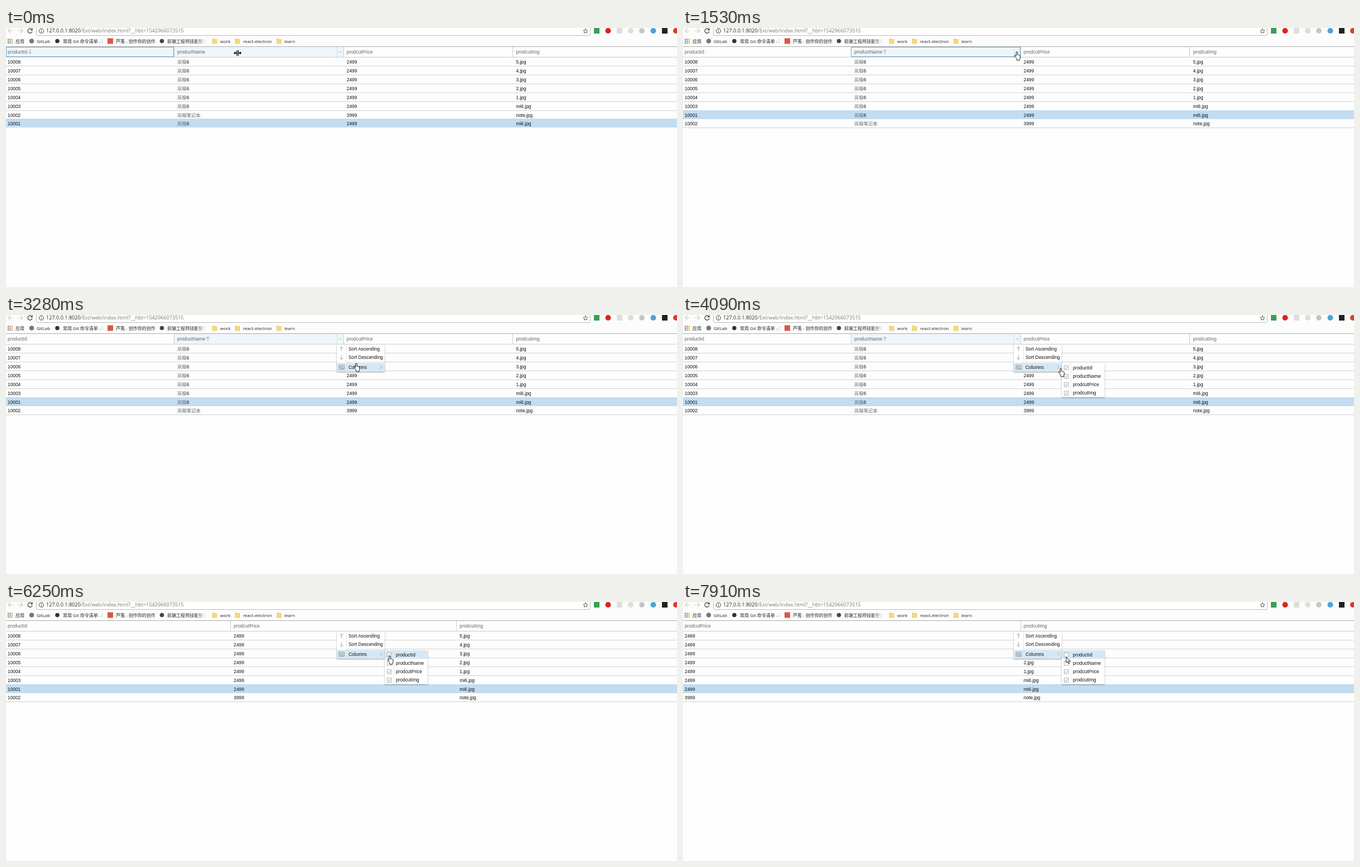
Recreate the animation shown at these times as an HTML page. Size 1203x466 px, loop 8000 ms.

```html
<!DOCTYPE html>
<html lang="zh">
<head>
<meta charset="utf-8">
<title>Grid columns</title>
<style>
html, body { margin: 0; width: 100%; height: 100%; overflow: hidden; background: #fdfdfd; }
svg { display: block; width: 1203px; height: 466px; }
text { font: 8.35px "Liberation Sans", "Noto Sans CJK SC", "Noto Sans CJK", sans-serif; fill: #111; white-space: pre; }
.bar text { font: 8px "Open Sans", "Noto Sans CJK SC", "Noto Sans CJK", sans-serif; fill: #222; }
.bar .url { font-size: 9.1px; }
.url .path { fill: #777; }
.head { fill: #666; }
.cjk { fill: #666; font-weight: 300; }
.icon { fill: none; stroke: #999; stroke-width: .9; }
.cursor { stroke: #000; stroke-width: .9; stroke-linejoin: round; fill: #fff; }
</style>
</head>
<body>
<svg viewBox="0 0 1203 466">
  <defs>
    <linearGradient id="fade"><stop stop-color="#fcfcfc" stop-opacity="0"/><stop offset="1" stop-color="#fcfcfc"/></linearGradient>
    <filter id="shadow" x="-10%" y="-10%" width="120%" height="130%"><feDropShadow dx="0" dy="1" stdDeviation="1.3" flood-color="#666" flood-opacity=".65"/></filter>
  </defs>
  <rect width="1203" height="466" fill="#fdfdfd"/>
  <g class="bar">
    <rect width="1203" height="33" fill="#fcfcfc"/>
    <path d="M54.5 0V11Q54.5 13.5 57 13.5H1045Q1047.5 13.5 1047.5 11V0" fill="#fff" stroke="#bbb"/>
    <g fill="none" stroke="#ccc" stroke-width="1.1">
      <path d="M13 5H4M8 1 4 5 8 9M21 5H30M26 1 30 5 26 9"/>
      <path d="M46.5 3A4 4 0 1 0 47 6.2M47.2.5V3.7H44" stroke="#444" stroke-width="1.3"/>
      <g stroke="#555"><circle cx="63.5" cy="5.2" r="4"/><path d="M63.5 4.6V7.8M63.5 2.5V3.6"/></g>
      <path d="M1039 1 1040.2 4 1043.2 4.2 1040.9 6.2 1041.6 9.2 1039 7.6 1036.4 9.2 1037.1 6.2 1034.8 4.2 1037.8 4Z" stroke="#555" stroke-width=".9"/>
    </g>
    <text class="url" x="72" y="8.4">127.0.0.1:8020<tspan class="path">/Ext/web/index.html?__hbt=1542966073515</tspan></text>
    <g id="marks"></g>
    <text x="17" y="26.8">应用</text>
    <text x="55" y="26.8">GitLab</text>
    <text x="102" y="26.8">常用 Git 命令清单 -</text>
    <path d="M172.5 20V28" stroke="#ccc"/>
    <text x="197" y="26.8">芦笺 - 创作你的创作</text>
    <text x="289" y="26.8">前端工程师技能整理</text>
    <rect x="340" y="16" width="18" height="14" fill="url(#fade)"/>
    <rect x="358" y="16" width="6" height="14" fill="#fcfcfc"/>
    <text x="384" y="26.8">work</text>
    <text x="425" y="26.8">react-electron</text>
    <text x="499" y="26.8">learn</text>
  </g>
  <g id="view"></g>
</svg>
<script>
const LOOP = 8000, HEAD_Y = 33, ROW_Y = 52.5, ROW_H = 15.9;
const FIELDS = ['productId', 'productName', 'prodcutPrice', 'prodcutImg'];
const PHONE = '岚榆6', LAPTOP = '岚榆笔记本';
const ROWS = ['5.jpg', '4.jpg', '3.jpg', '2.jpg', '1.jpg', 'mi6.jpg', 'note.jpg', 'mi6.jpg']
  .map((img, i) => i === 6 ? ['10002', LAPTOP, '3999', img] : [String(10008 - i), PHONE, '2499', img]);

const rect = (x, y, w, h, fill, more = '') => `<rect x="${x}" y="${y}" width="${w}" height="${h}" fill="${fill}" ${more}/>`;
const text = (x, y, s, cls = '') => `<text x="${x}" y="${y}" class="${cls}">${s}</text>`;
const icon = (x, y, d) => `<path class="icon" transform="translate(${x} ${y})" d="${d}"/>`;
const dot = (x, y, r, fill) => `<circle cx="${x}" cy="${y}" r="${r}" fill="${fill}"/>`;

const UP = 'M0 9V1M-3 4 0 1 3 4', DOWN = 'M0 0V8M-3 5 0 8 3 5';
const CURSORS = {
  hand: '<path d="M-1 11-4 7.5Q-4.6 6.2-3.5 6-2.6 6-1.2 7.5V1Q-1.2 0 0 0 1.2 0 1.2 1V5Q2.4 4.6 3 5.6 4.2 5.2 4.6 6.3 6 6 6 7.5V10.5Q5.9 12 5 13.3V15H0V13.3Z"/>',
  arrow: '<path d="M0 0V10.5L2.4 8.2 4 12 5.8 11.2 4.2 7.6H7.4Z"/>',
  resize: '<path d="M-1.2-5V5M1.2-5V5M-6 0H-1.2M1.2 0H6M-4-2-6 0-4 2M4-2 6 0 4 2" fill="none" stroke-width="1.3"/>'
};

// [time, cursor, x, y, changes that persist]
const STEPS = [
  [0, 'resize', 415.3, 45, { cols: [0, 1, 2, 3], sort: 0, focus: 0, hover: [1], item: -1, menu: 0, sub: 0, subItem: -1, off: [] }],
  [130, 'hand', 424, 42],
  [270, 'hand', 430, 42, { focus: 1 }],
  [410, 'hand', 432, 42, { sort: 1 }],
  [550, 'hand', 440, 42],
  [690, 'hand', 468, 43],
  [830, 'hand', 510, 43],
  [970, 'hand', 552, 43],
  [1110, 'hand', 581, 42],
  [1260, 'hand', 588, 39],
  [1395, 'hand', 595, 40],
  [1530, 'hand', 598.5, 43],
  [1810, 'hand', 598.5, 43, { menu: 1 }],
  [2090, 'hand', 600, 45],
  [2250, 'hand', 602, 47],
  [2410, 'resize', 604, 49],
  [2570, 'resize', 606, 52, { hover: [1, 2] }],
  [2730, 'resize', 607.5, 53.7],
  [2880, 'hand', 613, 62, { hover: [1], focus: -1, item: 0 }],
  [3040, 'hand', 621, 79, { item: 1 }],
  [3160, 'hand', 628, 87, { item: 2 }],
  [3290, 'hand', 635, 90],
  [3420, 'hand', 642, 92, { sub: 1 }],
  [3560, 'hand', 650, 93],
  [3690, 'hand', 658, 94],
  [3820, 'hand', 666, 95],
  [3960, 'hand', 672, 96],
  [4090, 'hand', 677.5, 96],
  [4250, 'hand', 682, 98, { subItem: 0 }],
  [4400, 'hand', 685, 101],
  [4550, 'hand', 687, 105, { subItem: 1 }],
  [4700, 'hand', 688, 106],
  [4840, 'arrow', 688, 106],
  [4960, 'arrow', 688, 106, { cols: [0, 2, 3], hover: [] }],
  [5240, 'arrow', 688, 106, { off: [1] }],
  [5950, 'hand', 688, 106],
  [6100, 'hand', 688, 101, { subItem: 0 }],
  [6250, 'hand', 688, 97],
  [6640, 'hand', 688, 97, { cols: [2, 3] }],
  [6780, 'arrow', 687, 99, { off: [0, 1] }],
  [7070, 'arrow', 687, 107, { subItem: 1 }],
  [7370, 'hand', 687, 106],
  [7505, 'hand', 687, 103, { subItem: 0 }],
  [7640, 'hand', 687, 99],
  [7910, 'arrow', 687, 99]
];
let carried = {};
const STATES = STEPS.map(([time, cursor, x, y, change]) => {
  carried = { ...carried, ...change };
  return { ...carried, time, cursor, x, y };
});

function cell(x, y, value) {
  if (value !== PHONE && value !== LAPTOP) return text(x, y, value);
  return text(x, y, value.replace('6', '<tspan fill="#111" font-weight="400">6</tspan>'), 'cjk');
}

function grid({ cols, sort, focus, hover }) {
  const width = 1215 / cols.length;
  const left = k => Math.max(0, Math.round(k * width - 3));
  const textX = k => k ? k * width + 3.3 : 3;
  const rows = sort === 0 ? ROWS : [...ROWS.slice(0, 6), ROWS[7], ROWS[6]];
  let out = rect(0, HEAD_Y, 1203, 1, '#aaa');
  cols.forEach((field, k) => {
    const x = left(k), end = Math.min(1203, left(k + 1)), on = hover.includes(field);
    if (on || focus === field) out += rect(x, 34, end - x, 18, '#eef6fb');
    if (k) out += rect(x, 34, 1, 18, '#ccc');
    if (on) out += rect(end - 12, 34, 1, 18, '#cbdde8') + icon(end - 5.5, 42, 'M-2 0 0 2 2 0');
    if (focus === field) out += rect(x + .5, 34.5, end - x - 1, 17, 'none', 'stroke="#78a9c9"');
    out += text(textX(k), 45.8, FIELDS[field], 'head');
    if (sort === field) out += icon(field ? 362 : 43, 38, field ? UP : DOWN);
  });
  out += rect(0, 52, 1203, 1, '#ccc');
  rows.forEach((row, i) => {
    const y = Math.round(ROW_Y + i * ROW_H - .4);
    const base = ROW_Y + i * ROW_H + 11.6;
    out += row[0] === '10001' ? rect(0, y, 1203, 16, '#c2dcf1') : rect(0, y + 16, 1203, 1, '#d2d2d2');
    cols.forEach((field, k) => out += cell(textX(k), base, row[field]));
  });
  return out;
}

function panel(x, y, w, h, dividerX) {
  return rect(x, y, w, h, '#fff', 'filter="url(#shadow)"') + rect(dividerX, y, 1, h, '#e6e6e6');
}

function menu({ item }) {
  let out = panel(593, 53, 86, 49, 610) + rect(611, 84, 68, 1, '#e0e0e0');
  if (item >= 0) out += rect(593, [53, 68, 86][item], 86, [15, 16, 16][item], '#d6e8f5');
  return out + icon(601.5, 56, UP) + icon(601.5, 72, DOWN)
    + icon(597, 90, 'M0 0H9.5V8H0ZM0 2.5H9.5M0 5H5M3 2.5V8M6.3 2.5V8M5 6.5H9.5')
    + icon(671, 91, 'M0 0 3 3 0 6')
    + ['Sort Ascending', 'Sort Descending', 'Columns'].map((s, i) => text(614, [63.5, 78.8, 96.9][i], s)).join('');
}

function submenu({ subItem, off }) {
  let out = panel(679, 87, 77, 61, 695);
  if (subItem >= 0) out += rect(679, 87 + subItem * 15.25, 77, 15.25, '#d6e8f5');
  FIELDS.forEach((name, i) => {
    const y = 91 + i * 15.2;
    out += rect(683.5, y + .2, 7.5, 7.5, '#fff', 'stroke="#aaa" stroke-width=".9"');
    if (!off.includes(i)) out += icon(683.5, y, 'M1.5 4 3.2 6 6.5 2');
    out += text(699, 97.7 + i * 15.25, name);
  });
  return out;
}

const view = document.getElementById('view');
function render(s) {
  view.innerHTML = grid(s) + (s.menu ? menu(s) : '') + (s.sub ? submenu(s) : '')
    + `<g class="cursor" transform="translate(${s.x} ${s.y})">${CURSORS[s.cursor]}</g>`;
}

function drawMarks() {
  const apps = ['#e34b3d', '#e34b3d', '#e9a22b', '#3c9d58', '#4080e8', '#e9a22b', '#3c9d58', '#4080e8', '#e9a22b'];
  let out = apps.map((c, i) => rect(3 + i % 3 * 3.4, 19.5 + Math.floor(i / 3) * 3.2, 2.1, 2.1, c)).join('');
  out += dot(46, 23.5, 4.3, '#777') + dot(92, 23.5, 3.8, '#333') + rect(182, 18.5, 10, 10, '#d65a45') + dot(279.5, 23.5, 3.8, '#444');
  for (const x of [370, 411, 485.5])
    out += `<path d="M${x} 19.5H${x + 3.5}L${x + 4.5} 20.5H${x + 8}V28H${x}Z" fill="#f6d979" stroke="#e3bd55" stroke-width=".6"/>`;
  out += rect(1054, 0, 10, 10, '#3c9d58') + dot(1079.5, 5, 5, '#d8261f') + rect(1095, 0, 10, 10, '#ddd')
    + dot(1120, 5, 5, '#ddd') + dot(1140, 5, 4.8, '#c4c4c4') + dot(1160.5, 5, 5, '#4ba3d6')
    + rect(1176, 0, 10, 10, '#222') + dot(1201, 5, 5, '#dd3b2c');
  document.getElementById('marks').innerHTML = out;
}

let shown;
function tick() {
  const t = performance.now() % LOOP;
  const state = STATES.findLast(s => s.time <= t);
  if (state !== shown) render(shown = state);
  requestAnimationFrame(tick);
}
drawMarks();
tick();
</script>
</body>
</html>
```
